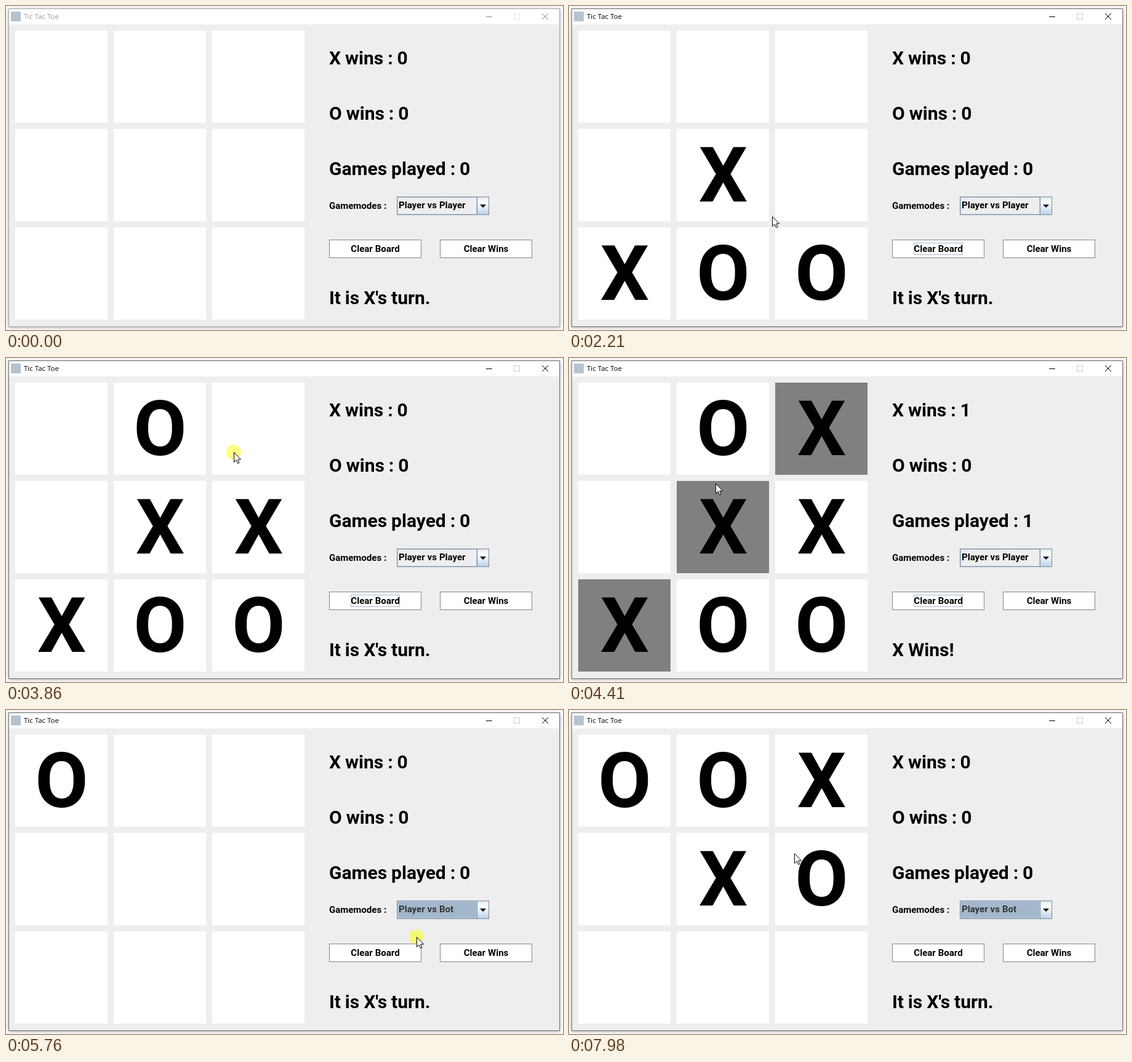
An HTML page for the animation above (8000 ms loop, 905 by 527 pixels).

```html
<!DOCTYPE html>
<html lang="en">
<head>
<meta charset="utf-8">
<title>Tic Tac Toe</title>
<style>
  html, body { margin: 0; width: 100%; height: 100%; overflow: hidden; background: #fff; }
  .window {
    position: absolute; left: 4px; top: 4px; width: 896px; height: 518px;
    box-shadow: 0 1px 5px rgba(0, 0, 0, .38);
  }
  svg { position: absolute; left: 0; top: 0; display: block; }
  text { font-family: Roboto, Arial, sans-serif; font-weight: 700; fill: #000; white-space: pre; }
  .big { font-size: 30px; word-spacing: -.55px; }
  .small { font-size: 15px; word-spacing: .25px; }
  .mark { font-size: 125px; text-anchor: middle; }
  .mid { text-anchor: middle; }
  .caption { font: 400 11.5px "Open Sans", "Noto Sans", sans-serif; }
  .line { fill: none; stroke: #7a8a99; }
  .button { fill: #fff; stroke: #7a8a99; }
  .chosen { fill: #333; }
  .control { fill: none; stroke: #000; }
  .frame { fill: none; stroke: #707070; }
  .control.off { stroke: #ccc; }
  .idle .caption { fill: #999; }
  .idle .control { stroke: #888; }
  .idle .control.off { stroke: #e4e4e4; }
  .idle .frame { stroke: #aaa; }
</style>
</head>
<body>
<div class="window"></div>
<svg id="app" width="905" height="527" viewBox="0 0 905 527">
  <defs>
    <linearGradient id="shine" x1="0" y1="0" x2="0" y2="1">
      <stop offset="0" stop-color="#dde8f3"/>
      <stop offset=".3" stop-color="#fff"/>
      <stop offset="1" stop-color="#b8cfe5"/>
    </linearGradient>
  </defs>

  <rect x="4" y="4" width="896" height="518" fill="#eee"/>
  <rect x="4" y="4" width="896" height="26" fill="#fff"/>
  <rect class="frame" x="4.5" y="4.5" width="895" height="517"/>
  <rect x="8" y="9" width="16" height="16" fill="#b4c3d2"/>
  <text class="caption" x="29" y="21">Tic Tac Toe</text>
  <path class="control" d="M780 17.5h10"/>
  <rect class="control off" x="825.5" y="12.5" width="9" height="9"/>
  <path class="control" d="M871 12l10 10M881 12l-10 10"/>

  <g id="board"></g>

  <text class="big" id="xWins" x="525" y="95"></text>
  <text class="big" x="525" y="185">O wins : 0</text>
  <text class="big" id="games" x="525" y="275"></text>
  <text class="big" id="status" x="525" y="485"></text>

  <text class="small" x="525" y="330">Gamemodes :</text>
  <rect id="combo" x="635" y="310" width="131" height="30"/>
  <rect x="636.5" y="311.5" width="128" height="27" fill="none" stroke="#b8cfe5"/>
  <rect x="765" y="310" width="20" height="30" fill="url(#shine)"/>
  <rect class="line" x="635.5" y="310.5" width="149" height="29"/>
  <path class="line" d="M765.5 310v30"/>
  <path d="M770 323h10l-5 5z"/>
  <text class="small" id="mode" x="638" y="329"></text>

  <rect class="button" x="525.5" y="380.5" width="149" height="29"/>
  <rect class="button" x="705.5" y="380.5" width="149" height="29"/>
  <text class="small mid" x="600" y="400">Clear Board</text>
  <text class="small mid" x="780" y="400">Clear Wins</text>
  <rect id="focus" x="560.5" y="385.5" width="79" height="19" fill="none" stroke="#a3b8cc"/>

  <g id="popup">
    <rect x="635.5" y="340.5" width="149" height="61" fill="#eee" stroke="#000"/>
    <rect id="hover" x="636" width="148" height="20" fill="#a3b8cc"/>
  </g>

  <g id="pointer">
    <circle id="halo" r="12" fill="#ff0" fill-opacity=".5"/>
    <path d="M.5 .5V16.5L4.2 13L6.6 18.5L9 17.5L6.7 12H11.6Z" fill="#fff" stroke="#000"/>
  </g>
</svg>

<script>
const LOOP = 8000, START = 132, STEP = 79.2;   // ms; the screen updates once per STEP
const REST_BEFORE = 3, REST_AFTER = 2;         // updates the pointer stays still around a press
const MODES = ["Player vs Player", "Player vs Bot", "Bot vs Bot"];
const BOT_CELLS = [0, 1, 5];

// Where the pointer goes: update number and place.
const press = (at, x, y) => ({ at, x, y, click: true, from: at - REST_BEFORE, to: at + REST_AFTER });
const pass = (at, x, y) => ({ at, x, y, from: at, to: at });
const STOPS = [
  press(0, 262, 290), press(9, 375, 393), press(16, 135, 406), press(22, 222, 384),
  press(33, 416, 309), press(40, 282, 142), press(47, 370, 153), pass(54, 238, 204),
  press(64, 664, 325), press(70, 667, 369), press(77, 258, 307), pass(84, 300, 335),
  press(95, 407, 155), pass(99, 366, 233)
];

const $ = id => document.getElementById(id);
const show = (el, on) => el.setAttribute("visibility", on ? "visible" : "hidden");

function add(parent, tag, attrs, label = "") {
  const el = document.createElementNS("http://www.w3.org/2000/svg", tag);
  for (const key in attrs) el.setAttribute(key, attrs[key]);
  el.textContent = label;
  parent.append(el);
  return el;
}

const cells = Array.from({ length: 9 }, (_, i) => {
  const x = 15 + i % 3 * 160, y = 40 + Math.floor(i / 3) * 160;
  return {
    box: add($("board"), "rect", { x, y, width: 150, height: 150 }),
    mark: add($("board"), "text", { class: "mark", x: x + 75.5, y: y + 118 })
  };
});

const items = MODES.map((name, i) =>
  add($("popup"), "text", { class: "small", x: 637, y: 356 + i * 20 }, name));

const rowAt = y => Math.max(0, Math.floor((y - 341) / 20));
const cellAt = (x, y) => Math.floor((x - 10) / 160) + 3 * Math.floor((y - 35) / 160);

function winningLine(board) {
  const lines = [[0, 4, 8], [2, 4, 6]];
  for (let i = 0; i < 3; i++) lines.push([3 * i, 3 * i + 1, 3 * i + 2], [i, i + 3, i + 6]);
  return lines.find(([a, b, c]) => board[a] && board[a] === board[b] && board[a] === board[c]);
}

// Replays every press that has taken effect by this update.
function play(now) {
  const game = { board: [], turn: "X", mode: 0, open: false, focus: now >= 0 };
  const bot = [...BOT_CELLS];
  const put = cell => {
    game.board[cell] = game.turn;
    game.turn = game.turn === "X" ? "O" : "X";
  };
  for (const { x, y } of STOPS.filter(s => s.click && s.at < now)) {
    if (x < 500) {
      put(cellAt(x, y));
    } else if (!game.open) {
      game.open = true;
      game.focus = false;
      continue;
    } else {
      Object.assign(game, { board: [], turn: "O", mode: rowAt(y), open: false });
    }
    if (game.mode === 1) put(bot.shift());
  }
  game.line = winningLine(game.board);
  return game;
}

function pointerAt(now) {
  const next = STOPS.findIndex(s => s.to >= now);
  const b = STOPS[next], a = STOPS[next - 1] || b;
  const u = now >= b.from ? 1 : (now - a.to) / (b.from - a.to);
  const e = u * (2 - u);
  return { x: Math.round(a.x + (b.x - a.x) * e), y: Math.round(a.y + (b.y - a.y) * e) };
}

function draw(now) {
  const game = play(now), won = game.line ? 1 : 0;

  cells.forEach(({ box, mark }, i) => {
    mark.textContent = game.board[i] || "";
    box.setAttribute("fill", won && game.line.includes(i) ? "#808080" : "#fff");
  });

  $("xWins").textContent = `X wins : ${won}`;
  $("games").textContent = `Games played : ${won}`;
  $("status").textContent = won ? "X Wins!" : `It is ${game.turn}'s turn.`;

  $("mode").textContent = MODES[game.mode];
  $("mode").classList.toggle("chosen", game.mode > 0);
  $("combo").setAttribute("fill", game.mode ? "#a3b8cc" : "#eee");
  $("app").classList.toggle("idle", now < 0);
  show($("focus"), game.focus);

  const { x, y } = pointerAt(now), row = rowAt(y);
  show($("popup"), game.open);
  $("hover").setAttribute("y", 341 + row * 20);
  items.forEach((el, i) => el.classList.toggle("chosen", i === row));

  show($("pointer"), now >= 0);
  show($("halo"), STOPS.some(s => s.click && now >= s.at && now < s.to));
  $("pointer").setAttribute("transform", `translate(${x} ${y})`);
}

const begin = performance.now();
let shown;
function tick() {
  const t = (performance.now() - begin) % LOOP;
  const now = Math.max(-1, Math.floor((t - START) / STEP));
  if (now !== shown) draw(shown = now);
  requestAnimationFrame(tick);
}
tick();
</script>
</body>
</html>
```
